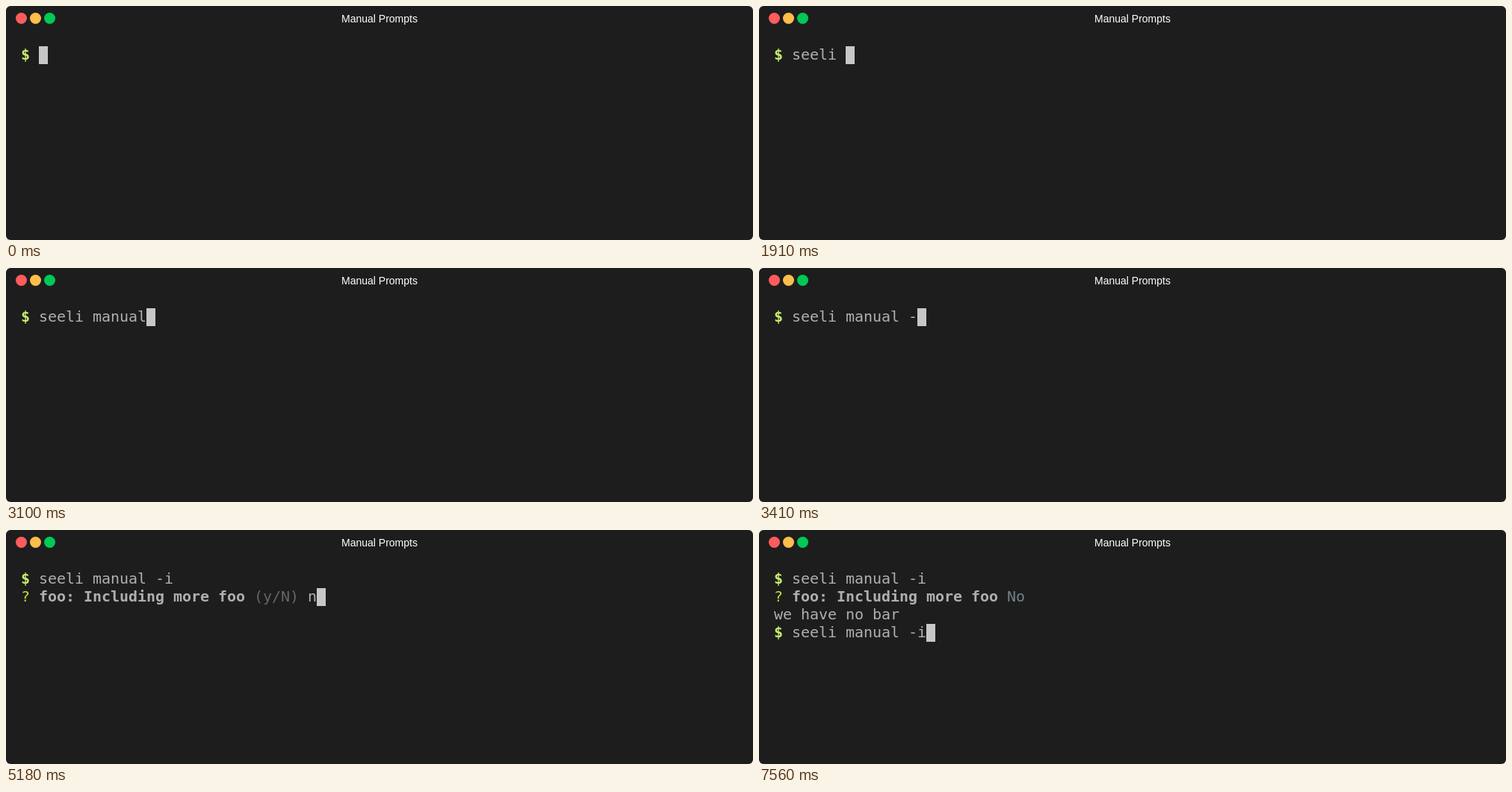
Write an HTML page that moves like this. It is 1000 by 314 pixels and loops after 8 s.

```html
<!DOCTYPE html>
<html lang="en">
<head>
<meta charset="utf-8">
<title>Manual Prompts</title>
<style>
  html, body { margin: 0; width: 100%; height: 100%; overflow: hidden; background: #fff; }
  #window { position: relative; width: 1000px; height: 314px; border-radius: 6px; background: #1d1d1d; }
  #window i { position: absolute; top: 9px; width: 15px; height: 15px; border-radius: 50%; }
  #title {
    position: absolute; top: 1px; width: 100%; text-align: center; color: #fff;
    font: 14px/32px "Liberation Sans", Arial, sans-serif;
  }
  #screen {
    position: absolute; left: 20px; top: 53px; margin: 0; color: #afafaf;
    font: 20px/24px "DejaVu Sans Mono", monospace; letter-spacing: calc(12px - 1ch);
  }
  #cursor { position: absolute; width: 12px; height: 24px; background: #c7c7c7; }
  .prompt { color: #c8ed71; font-weight: bold; }
  .mark { color: #b3e33b; }
  .answer { color: #708387; }
  .dim { opacity: .5; }
</style>
</head>
<body>
<div id="window">
  <i style="left:13px;background:#ff5c5c"></i>
  <i style="left:32px;background:#ffbd4c"></i>
  <i style="left:51px;background:#00ca56"></i>
  <div id="title">Manual Prompts</div>
  <div id="cursor"></div>
  <pre id="screen"></pre>
</div>
<script>
const LOOP = 8000;
const command = 'seeli manual -i';
const keyTimes = [680, 890, 1060, 1560, 1800, 1910, 2100, 2240, 2350, 2870, 2980, 3100, 3240, 3410, 3790];

const prompt = '<span class="prompt">$</span> ';
const entered = prompt + command + '\n';
const question = entered + '<span class="mark">?</span> <b>foo: Including more foo</b> ';
const hint = question + '<span class="dim">(y/N)</span> ';
const output = question + '<span class="answer">No</span>\nwe have no bar\n';

// Each step: start time and the screen's markup; the cursor follows the text.
const steps = [
  [0, prompt],
  ...keyTimes.map((time, i) => [time, prompt + command.slice(0, i + 1)]),
  [4030, entered],
  [4480, hint],
  [5180, hint + 'n'],
  [5680, output],
  [5780, output + prompt],
  [7560, output + prompt + command]
];

const screen = document.getElementById('screen');
const cursor = document.getElementById('cursor');
let shown;

function draw(now) {
  const time = now % LOOP;
  const markup = steps.filter(([start]) => start <= time).pop()[1];
  if (markup !== shown) {
    shown = screen.innerHTML = markup;
    const lines = screen.textContent.split('\n');
    cursor.style.left = 20 + 12 * lines[lines.length - 1].length + 'px';
    cursor.style.top = 30 + 24 * lines.length + 'px';
  }
}

const start = performance.now();
function frame() {
  draw(performance.now() - start);
  requestAnimationFrame(frame);
}
frame();
</script>
</body>
</html>
```
